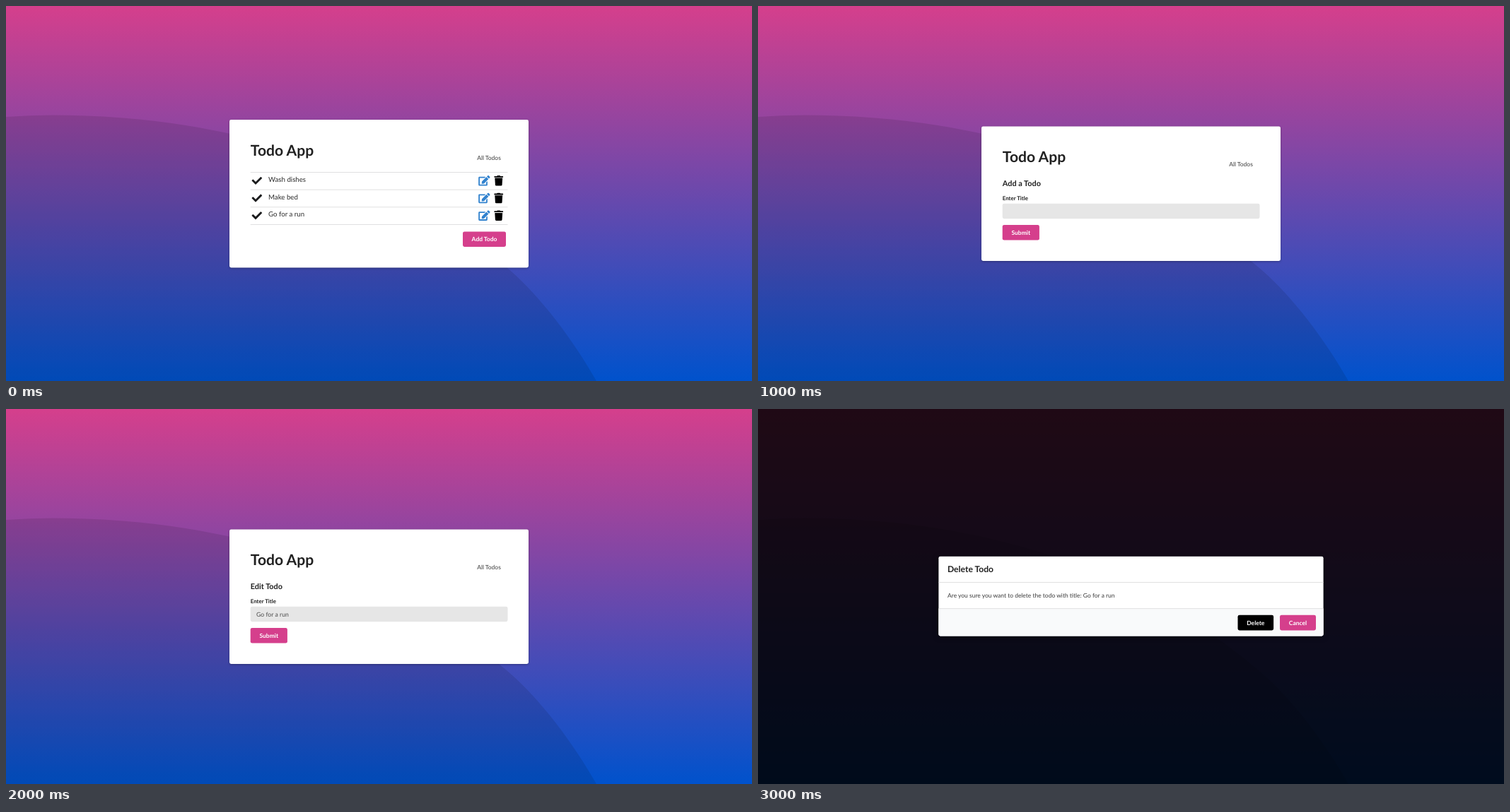
An HTML page for the animation above (4 s loop, 1055 px wide and 531 px high).

```html
<!DOCTYPE html>
<html lang="en">
<head>
<meta charset="utf-8">
<title>Todo list</title>
<style>
  html, body { margin: 0; width: 100%; height: 100%; overflow: hidden; }
  svg { display: block; width: 100vw; height: 100vh; }
  text { font-family: Lato, sans-serif; font-size: 8.47px; fill: #212121; text-rendering: geometricPrecision; }
  .bold { font-weight: 700; }
  .title { font-size: 21.1px; }
  .heading { font-size: 10.89px; }
  .label { font-size: 7.87px; }
  .item { font-size: 9.7px; fill: #2b2b2b; }
  .value { font-size: 8.7px; fill: #4c4c4c; }
  .modal-title { font-size: 12.1px; }
  .body { fill: #3a3a3a; }
  .button { fill: #fff; text-anchor: middle; }
  .card { filter: drop-shadow(0 1px 1.5px rgba(0, 0, 0, .3)); }
  .modal { filter: drop-shadow(.6px 1.8px 4px rgba(0, 0, 0, .4)); }
</style>
</head>
<body>
<svg viewBox="0 0 1055 531" preserveAspectRatio="none">
  <defs>
    <linearGradient id="sky" x2="0" y2="1">
      <stop stop-color="#d53f8c"/>
      <stop offset="1" stop-color="#0052cc"/>
    </linearGradient>
    <path id="check" d="M173.9 439.4L7.5 273a25.6 25.6 0 0 1 0-36.2l36.2-36.2a25.6 25.6 0 0 1 36.2 0L192 312.7 432.1 72.6a25.6 25.6 0 0 1 36.2 0l36.2 36.2a25.6 25.6 0 0 1 0 36.2L210.1 439.4a25.6 25.6 0 0 1-36.2 0z"/>
    <path id="edit" d="M402.6 83.2l90.2 90.2q7 7 0 13.8L274.4 405.6l-92.8 10.3c-12.4 1.4-22.9-9.1-21.5-21.5l10.3-92.8L388.8 83.2q7-6 13.8 0zM564.6 60.3l-48.8-48.8c-15.2-15.2-39.9-15.2-55.2 0l-35.4 35.4q-6 7 0 13.8l90.2 90.2q7 6 13.8 0l35.4-35.4c15.2-15.3 15.2-40 0-55.2zM384 346.2V448H64V128h229.8q5 0 8.5-3.5l40-40c7.6-7.6 2.2-20.5-8.5-20.5H48a48 48 0 0 0-48 48v352a48 48 0 0 0 48 48h352a48 48 0 0 0 48-48V306.2c0-10.7-12.9-16-20.5-8.5l-40 40q-3.5 3.5-3.5 8.5z"/>
    <path id="trash" d="M432 32H312l-9.4-18.7A24 24 0 0 0 281.1 0H166.8a24 24 0 0 0-21.4 13.3L136 32H16A16 16 0 0 0 0 48v32a16 16 0 0 0 16 16h416a16 16 0 0 0 16-16V48a16 16 0 0 0-16-16zM53.2 467a48 48 0 0 0 47.9 45h245.8a48 48 0 0 0 47.9-45L416 128H32z"/>
  </defs>
  <rect width="1055" height="531" fill="url(#sky)"/>
  <path d="M0 157Q32 154.5 65 154.5C315 154.5 538 225.5 708 370C755 410 800 470 835 531H0z" opacity=".1"/>
  <g id="scene"></g>
</svg>
<script>
const PINK = '#d53f8c';
const STEP = 1000;
const scene = document.getElementById('scene');

const text = (x, y, str, cls) => `<text x="${x}" y="${y}" class="${cls}">${str}</text>`;

const rect = (x, y, w, h, fill, r = 0, cls = '') =>
  `<rect x="${x}" y="${y}" width="${w}" height="${h}" rx="${r}" fill="${fill}" class="${cls}"/>`;

const button = (x, y, w, label, fill = PINK) =>
  rect(x, y, w, 21.6, fill, 2.4) + text(x + w / 2, y + 13.8, label, 'button bold');

const icon = (id, x, y, fill) =>
  `<use href="#${id}" transform="translate(${x} ${y}) scale(.0283)" fill="${fill}"/>`;

const rule = (x, y, w) => rect(x, y, w, .8, '#d9d9da');

const card = (y, h) =>
  rect(316, y, 423, h, '#fff', 2.4, 'card') +
  text(345.8, y + 51, 'Todo App', 'title bold') +
  text(666.2, y + 56.7, 'All Todos', 'body');

function listView() {
  const rows = ['Wash dishes', 'Make bed', 'Go for a run'].map((name, i) => {
    const y = 235 + i * 24.7;
    return icon('check', 347.6, y + 5.1, '#1b1c1d') +
      text(371, y + 13.9, name, 'item') +
      icon('edit', 668.2, y + 5, '#3182ce') +
      icon('trash', 690.4, y + 5, '#000') +
      rule(345.7, y + 24.7, 363.8);
  });
  return card(161, 209.4) + rule(345.7, 235, 363.8) + rows.join('') +
    button(646, 319.4, 61, 'Add Todo');
}

const formView = (heading, value) =>
  card(170.4, 190.6) +
  text(345.8, 255, heading, 'heading bold') +
  text(345.8, 274.8, 'Enter Title', 'label bold') +
  rect(345.7, 279.8, 363.8, 21.4, '#e6e6e6', 2.4) +
  text(354, 294, value, 'value') +
  button(345.7, 310, 52.2, 'Submit');

const deleteView = () =>
  rect(0, 0, 1055, 531, 'rgba(0,0,0,.85)') +
  rect(255.4, 208.8, 544.2, 112.7, '#fff', 2.4, 'modal') +
  '<path d="M255.4 282.8h544.2v36.3a2.4 2.4 0 0 1-2.4 2.4h-539.4a2.4 2.4 0 0 1-2.4-2.4z" fill="#f9fafb"/>' +
  rule(255.4, 245.2, 544.2) + rule(255.4, 282.3, 544.2) +
  text(268, 231.4, 'Delete Todo', 'modal-title bold') +
  text(268, 267.2, 'Are you sure you want to delete the todo with title: Go for a run', 'body') +
  button(678.5, 291.8, 50.6, 'Delete', '#000') +
  button(738, 291.8, 51, 'Cancel');

const views = [listView(), formView('Add a Todo', ''), formView('Edit Todo', 'Go for a run'), deleteView()];
let shown = -1;

function draw(time) {
  const index = Math.floor(time / STEP) % views.length;
  if (index === shown) return;
  shown = index;
  scene.innerHTML = views[index];
}

const start = performance.now();
function tick() {
  draw(performance.now() - start);
  requestAnimationFrame(tick);
}
tick();
</script>
</body>
</html>
```
